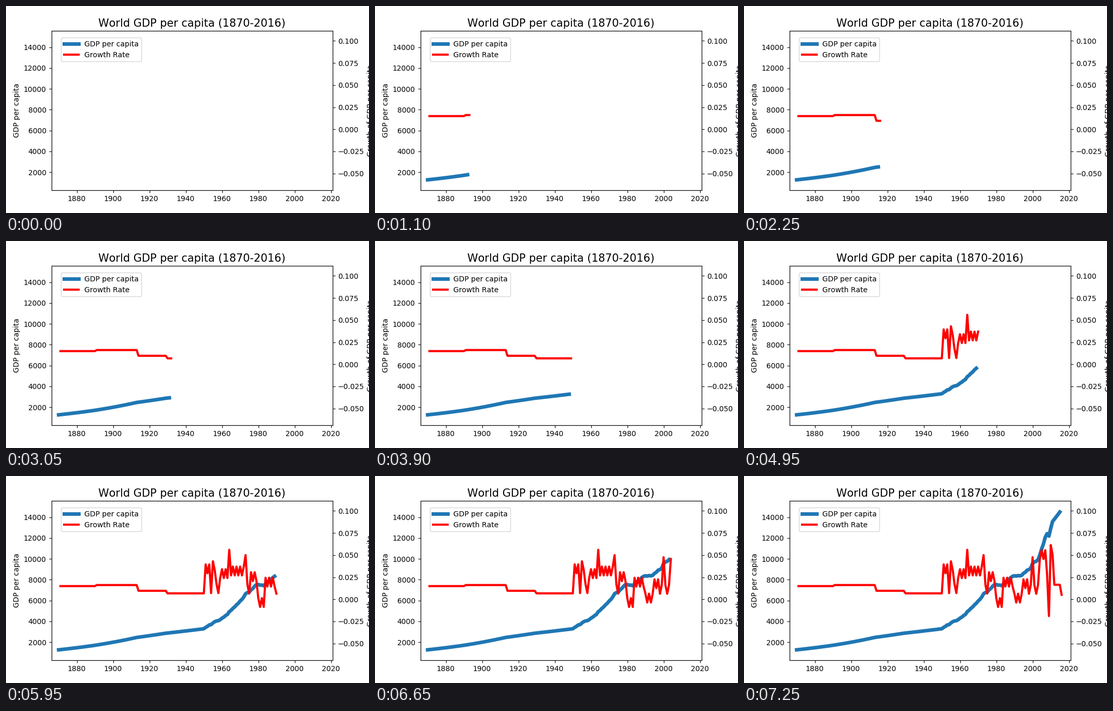
A matplotlib script for the animation above (7300 ms loop, 700 by 400 pixels).

```python
import numpy as np
import matplotlib.pyplot as plt
from matplotlib.animation import FuncAnimation

plt.rcParams["font.family"] = "DejaVu Sans"
plt.rcParams["text.kerning_factor"] = 6

START, END = 1870, 2016
BASE_GDP = 1263

# Average growth in percent from each year on
ERAS = {
    1871: 1.49, 1891: 1.61, 1914: 0.96, 1930: 0.67, 1951: 3.45, 1954: 1.2,
    1955: 3.8, 1957: 1.2, 1959: 2.9, 1964: 5.1, 1965: 3.2, 1973: 5.5,
    1974: 1.15, 1976: 2.56, 1980: -0.37, 1984: 1.94, 1990: 0.13, 1995: 1.76,
    1998: 1.12, 2000: 5.26, 2001: 1.12, 2004: 5.06, 2008: 3.27, 2009: -2.4,
    2010: 6.64, 2011: 4.55, 2012: 1.64, 2016: 0.5,
}


def growth_rate(year):
    """Era average plus a two-year wiggle that changes phase twice."""
    era = np.searchsorted(list(ERAS), year, side="right") - 1
    rate = np.array(list(ERAS.values()))[era]
    phase = np.where((year >= 1959) & (year < 1995), 1, -1)
    active = (year > 1950) & (year < 2012)
    return (rate + 0.5 * active * phase * np.cos(np.pi * year)) / 100


years = np.arange(START, END + 1)
growth = growth_rate(years[1:])
gdp = BASE_GDP * np.cumprod(np.append(1, 1 + growth))

fig, ax = plt.subplots(figsize=(7, 4), dpi=100)
ax.set_title("World GDP per capita (1870-2016)", fontsize=15)
ax.set_xlim(START - 4, END + 5)
ax.set_ylim(BASE_GDP - 1000, 15574)
ax.set_ylabel("GDP per capita")

ax2 = ax.twinx()
ax2.set_ylim(growth.min() - 0.05, growth.max() + 0.05)
ax2.set_ylabel("Growth of GDP per capita")

gdp_line, = ax.plot([], [], lw=5, color="C0", label="GDP per capita")
rate_line, = ax2.plot([], [], lw=3, color="red", label="Growth Rate")
fig.legend(loc="upper left", bbox_to_anchor=(0.022, 0.98),
           bbox_transform=ax.transAxes)


def update(i):
    n = i + 1
    gdp_line.set_data(years[:n], gdp[:n])
    rate_line.set_data(years[1:n + 1], growth[:n])
    return gdp_line, rate_line


anim = FuncAnimation(fig, update, frames=END - START, interval=50,
                     repeat=True, repeat_delay=0)
plt.show()
```
